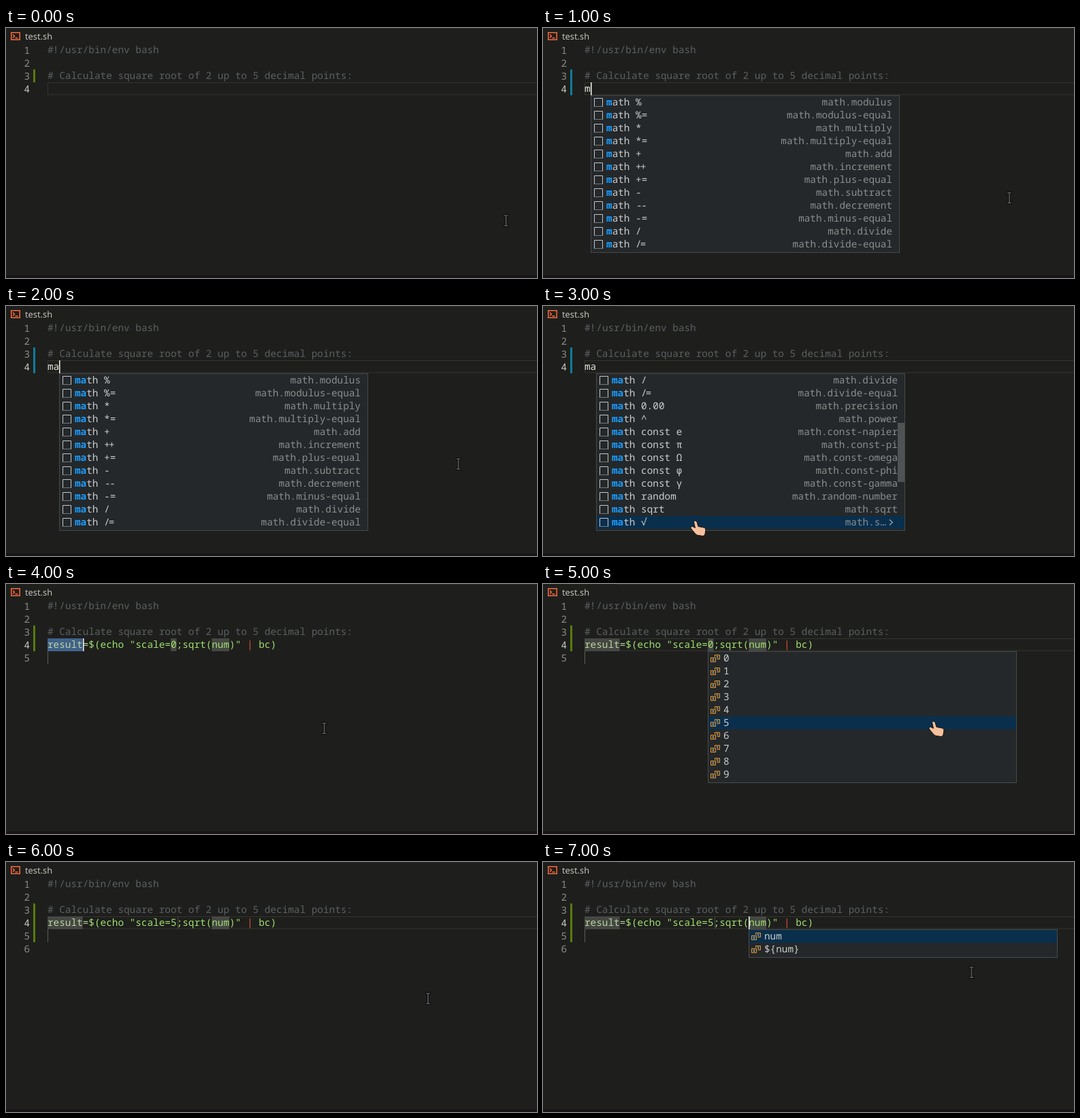
Animation of 780x368 px, one loop 8 s. Source, as an HTML page:

```html
<!DOCTYPE html>
<html lang="en">
<head>
<meta charset="utf-8">
<title>Shell snippet completion</title>
<style>
  html, body { margin: 0; width: 100%; height: 100%; overflow: hidden; background: #1e1f1c; }
  svg { display: block; width: 780px; height: 368px; }
  text {
    font: 14.36px "Noto Sans Mono", "DejaVu Sans Mono", monospace;
    white-space: pre;
    text-rendering: geometricPrecision;
    font-variant-ligatures: none;
  }
  .tab { font: 12.8px "Noto Sans", "Open Sans", sans-serif; }
</style>
</head>
<body>
<svg id="stage" viewBox="0 0 780 368" xmlns="http://www.w3.org/2000/svg">
  <defs>
    <g id="snippet" fill="none" stroke="#c5c5c5">
      <path d="M.5 12V.5h12V12"/>
      <path d="M0 12.5h13" stroke-dasharray="1 1"/>
    </g>
    <g id="choice" fill="none" stroke="#ee9d28">
      <path d="M6.500 3V.5h7v6h-4M.5 4.500h7v6h-7z"/>
      <path d="M8.500 2.500h3M9.500 4.500h2M2.500 6.500h3M2.500 8.500h3" stroke="#c5c5c5"/>
    </g>
    <g id="beam" fill="none">
      <path d="M-4 -7.500h8M-4 7.500h8M0 -8V8" stroke="#0b0b0b" stroke-width="4"/>
      <path d="M-3 -7.500h6M-3 7.500h6M0 -7V7" stroke="#595b5b" stroke-width="1.700"/>
    </g>
    <path id="hand" fill="#f5c09b" stroke="#15110f" stroke-linejoin="round"
      d="M-2.500 2q2-3 4.500 0l2 7 8 1.500q3.500 .5 3 4l-1 5.500q-.5 3.500-3.500 3l-7-1q-2.500-.5-4.500-3l-6-7.500q-.5-3 2.500-2.500l4 2z"/>
  </defs>
</svg>
<script>
const stage = document.getElementById('stage');
const CHAR = 8.616, LINE = 19, LEFT = 61, POP_Y = 99, POP_W = 453, STEP = 1000;
const C = {
  comment: '#5b5f64', plain: '#e6e6df', code: '#a0de70', name: '#b9d6a0', pipe: '#ee4f36',
  mark: '#454743', select: '#41618a', saved: '#587c0c', fresh: '#0c7d9d',
  popup: '#24282a', edge: '#46494a', row: '#0a2f4d', match: '#1a9dff', item: '#cccccc', detail: '#8c8d8d'
};
const col = n => LEFT + n * CHAR;
const top4 = 80;

const rect = (x, y, w, h, fill, extra = '') =>
  `<rect x="${x}" y="${y}" width="${w}" height="${h}" fill="${fill}" ${extra}/>`;
const text = (x, y, fill, s, extra = '') => `<text x="${x}" y="${y}" fill="${fill}" ${extra}>${s}</text>`;
const span = (fill, s) => `<tspan fill="${fill}">${s}</tspan>`;
const use = (id, x, y) => `<use href="#${id}" x="${x}" y="${y}"/>`;
const caret = n => rect(Math.round(col(n)), top4, 1.5, LINE, '#f8f8f0');
const box = (from, len, fill = C.mark) => rect(col(from), top4, len * CHAR, LINE, fill);

// Operator pairs sit closer together
const tight = s => s
  .replace('++', '+<tspan dx="-1.8">+</tspan>')
  .replace('--', '<tspan dx="1">-</tspan><tspan dx="-1.5">-</tspan>')
  .replace('/=', '/<tspan dx="-2">=</tspan>');

const math = [
  ['%', 'modulus'], ['%=', 'modulus-equal'], ['*', 'multiply'], ['*=', 'multiply-equal'],
  ['+', 'add'], ['++', 'increment'], ['+=', 'plus-equal'], ['-', 'subtract'],
  ['--', 'decrement'], ['-=', 'minus-equal'], ['/', 'divide'], ['/=', 'divide-equal'],
  ['0.00', 'precision'], ['^', 'power'], ['const e', 'const-napier'], ['const π', 'const-pi'],
  ['const Ω', 'const-omega'], ['const ϕ', 'const-phi'], ['const γ', 'const-gamma'],
  ['random', 'random-number'], ['sqrt', 'sqrt'], ['√', 's…']
];

function popup(x, rows, active, draw) {
  let out = rect(x + .5, POP_Y + .5, POP_W, rows.length * LINE + 3, C.popup, `stroke="${C.edge}"`);
  rows.forEach((row, i) => {
    const y = POP_Y + 1 + i * LINE;
    if (i === active) out += rect(x + 1, y, POP_W - 1, LINE, C.row);
    out += draw(row, y, i === active);
  });
  return out;
}

function mathPopup(x, typed, first, active) {
  return popup(x, math.slice(first, first + 12), active, ([op, detail], y, on) =>
    use('snippet', x + 5, y + 3) +
    text(x + 23, y + 14, C.item,
      `<tspan fill="${C.match}" font-weight="700">${'math'.slice(0, typed)}</tspan>${'math'.slice(typed)} ${tight(op)}`) +
    text(x + (on ? 426 : 443), y + 14, C.detail, 'math.' + detail, 'text-anchor="end"') +
    (on ? `<path d="M${x + 431} ${y + 5.5}l4.500 4-4.500 4" fill="none" stroke="#a5a8aa" stroke-width="1.200"/>` : ''));
}

const choicePopup = (x, rows, active) => popup(x, rows, active, (s, y) =>
  use('choice', x + 4, y + 4) + text(x + 23, y + 14, C.item, s));

function numbers(count) {
  let out = '';
  for (let n = 1; n <= count; n++)
    out += text(26.5, 19 + n * LINE, n === 4 ? '#c8c8c3' : '#8b8c86', n);
  return out;
}

const bar = (lines, fill) => rect(40, 61, 3, lines * LINE, fill);
const border = rect(61.5, 80.5, 730, 17.5, 'none', 'stroke="#343530"');
const guide = rect(61, POP_Y, 1, LINE, '#5d5e58');
const typing = s => text(LEFT, 94, C.plain, s);
const command = scale => text(LEFT, 94, C.code,
  span(C.name, 'result=') + `$(echo "scale=${scale};sqrt(num)" ` + span(C.pipe, '|') + ' bc)');

const base =
  rect(0, 0, 780, 368, '#1e1f1c') +
  rect(109, 0, 671, 1, '#2b2c29') +
  rect(0, 364, 780, 4, '#191417') +
  '<g fill="none" stroke="#f4693f" stroke-width="1.500"><path d="M7.750 6.750h12.500v10.500h-12.500z"/>' +
  '<path d="M10 9.500l2.500 2.500-2.500 2.500M13.500 14.700h4"/></g>' +
  text(28, 17, '#c4c4be', 'test.sh', 'class="tab"') +
  text(LEFT, 37, C.comment, '#<tspan dx="-1">!</tspan><tspan dx="1">/</tspan>usr/bin/env bash') +
  text(LEFT, 75, C.comment, '# Calculate square root of 2 up to 5 decimal points:');

const digits = [...'0123456789'];
const scenes = [
  numbers(4) + bar(1, C.saved) + border + use('beam', 734.5, 283.5),

  numbers(4) + bar(2, C.fresh) + border + typing('m') + caret(1) +
    mathPopup(70, 1, 0, -1) + use('beam', 685, 250),

  numbers(4) + bar(2, C.fresh) + border + typing('ma') + caret(2) +
    mathPopup(78, 2, 0, -1) + use('beam', 664.5, 232.5),

  numbers(4) + bar(2, C.fresh) + border + typing('ma') +
    mathPopup(78, 2, 10, 11) + rect(521, 172, 10, 87, '#505354') + use('hand', 224, 315.5),

  numbers(5) + bar(2, C.saved) + guide + box(0, 6, C.select) + box(21, 1) + box(28, 3) +
    command(0) + caret(6) + use('beam', 467.5, 212.5),

  numbers(5) + bar(2, C.saved) + border + guide + box(0, 6) + box(21, 1) + box(28, 3) +
    command(0) + choicePopup(242, digits, 5) + use('hand', 574, 201.5),

  numbers(6) + bar(3, C.saved) + border + guide + box(0, 6) + rect(252, top4, 1, LINE, C.mark) +
    box(28, 3) + command(5) + use('beam', 620, 201),

  numbers(6) + bar(3, C.saved) + border + guide + box(0, 6) + rect(252, top4, 1, LINE, C.mark) +
    box(28, 3) + command(5) + caret(28) + choicePopup(302, ['num', '${num}'], 0) + use('beam', 629.5, 162.5)
];

stage.insertAdjacentHTML('beforeend', base + scenes.map(s => `<g class="scene" display="none">${s}</g>`).join(''));
const groups = [...stage.querySelectorAll('.scene')];
const start = performance.now();
let shown = -1;

function show(now) {
  const i = Math.floor(Math.max(0, now - start) / STEP) % groups.length;
  if (i !== shown) {
    groups.forEach((g, k) => g.setAttribute('display', k === i ? 'inline' : 'none'));
    shown = i;
  }
  requestAnimationFrame(show);
}
show(start);
</script>
</body>
</html>
```
